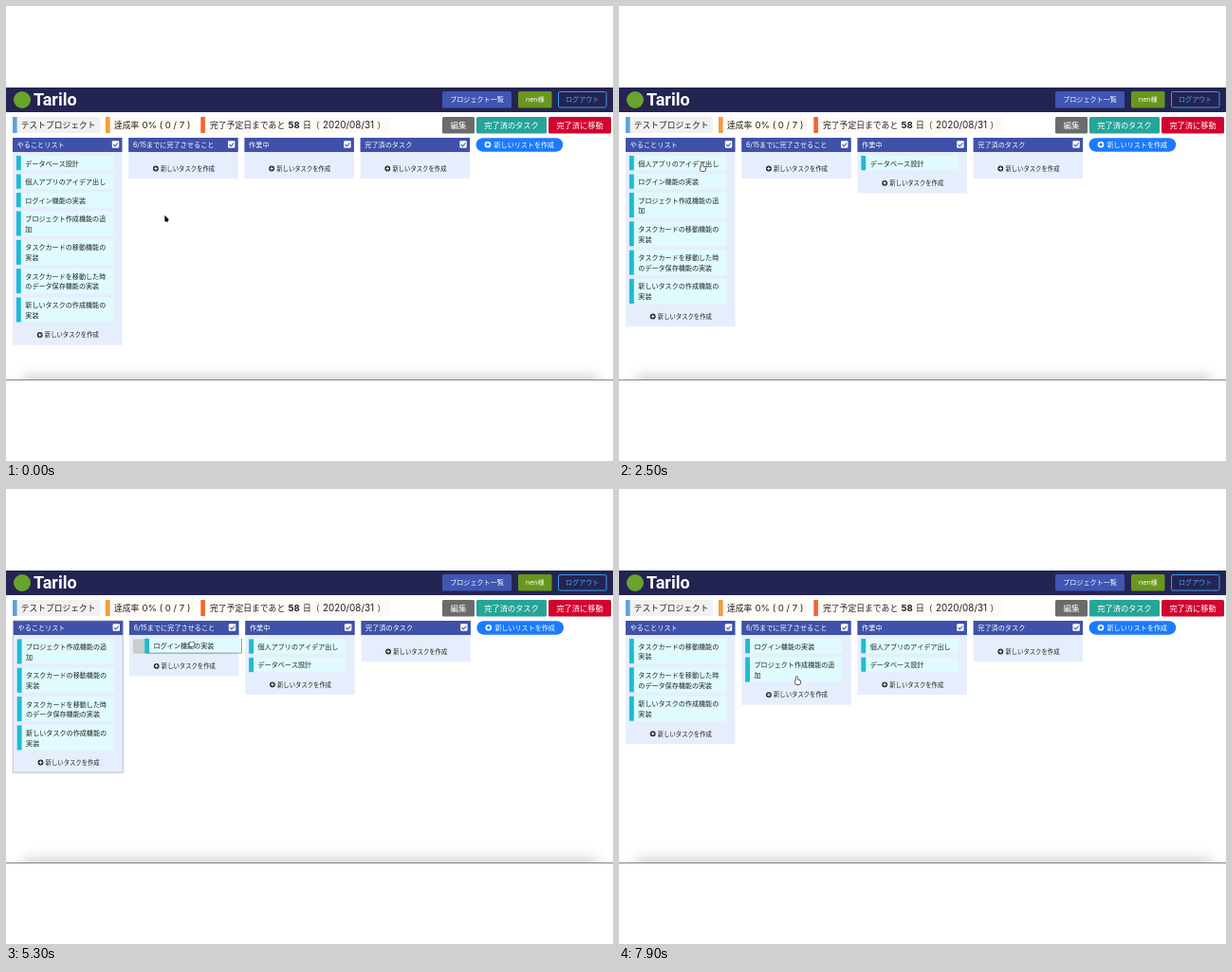
Animation of 640x480 px, one loop 8000 ms. Source, as an HTML page with a canvas:

```html
<!DOCTYPE html>
<html lang="ja">
<head>
<meta charset="utf-8">
<title>タスクボード</title>
<style>
html, body { margin: 0; width: 100%; height: 100%; overflow: hidden; background: #fff; }
canvas { display: block; width: 640px; height: 480px; }
</style>
</head>
<body>
<canvas id="stage" width="640" height="480"></canvas>
<script>
const ctx = document.getElementById('stage').getContext('2d');
const LOOP = 8000, STEP = 100;
const REST = 200; // pause at every pointer stop
const LAG = 250;  // the free slot trails the pointer
const FAMILY = 'Inter, "Noto Sans CJK JP", "Noto Sans CJK", sans-serif';
const INK = '#222', INDIGO = '#3f51a9', PALE = '#e6eefd';
const TOP = 158, LEFT = 7, PITCH = 122.2, LIST_W = 115.5, CARD_W = 102.3, INSET = 3.9, GAP = 4.2;

const tasks = [
  'データベース設計',
  '個人アプリのアイデア出し',
  'ログイン機能の実装',
  'プロジェクト作成機能の追加',
  'タスクカードの移動機能の実装',
  'タスクカードを移動した時のデータ保存機能の実装',
  '新しいタスクの作成機能の実装'
].map(s => s.match(/.{1,12}/g)); // twelve characters fit on a line

const columns = ['やることリスト', '6/15までに完了させること', '作業中', '完了済のタスク'];

// Pointer stops: arrival time, x, y, action on leaving
const stops = [
  [-100, 169, 224.5],
  [500, 71.5, 159.5, 'pick'], [1600, 315, 172, 'drop'],
  [2400, 88.5, 170, 'pick'], [3300, 318, 166, 'drop'],
  [3900, 75, 168],
  [4400, 61.5, 164.5, 'pick'], [5300, 196, 164, 'drop'],
  [6000, 46.7, 160.7, 'pick'], [6600, 190.5, 169.5], [7200, 188.5, 202, 'drop']
];
const leaving = action => stops.filter(s => s[3] === action).map(s => s[0] + REST);
const picks = leaving('pick'), drops = leaving('drop');

function pointer(t) {
  const i = stops.findLastIndex(s => s[0] <= t);
  const [t0, x0, y0] = stops[i], [t1, x1, y1] = stops[i + 1] || [LOOP, x0, y0];
  const u = Math.max(0, (t - t0 - REST) / (t1 - t0 - REST)), k = u * u * (3 - 2 * u);
  return [x0 + (x1 - x0) * k, y0 + (y1 - y0) * k];
}

// The first card of the first list is always the one taken
function board(t) {
  const lists = [tasks.map((_, i) => i), [], [], []];
  picks.forEach((start, card) => {
    if (t < start) return;
    const [x, y] = pointer(Math.max(start, Math.min(t, drops[card]) - LAG));
    const list = lists[Math.floor((x - LEFT) / PITCH)];
    lists[0].shift();
    list.splice(Math.floor((y - TOP) / 20), 0, card);
  });
  return lists;
}

function box(x, y, w, h, color, r = 0) {
  ctx.fillStyle = color;
  ctx.beginPath();
  ctx.roundRect(x, y, w, h, r);
  ctx.fill();
}
function outline(x, y, w, h, color, width, r = 0) {
  ctx.strokeStyle = color;
  ctx.lineWidth = width;
  ctx.beginPath();
  ctx.roundRect(x, y, w, h, r);
  ctx.stroke();
}
function text(s, x, cy, size, color = INK, align = 'left', weight = 400) {
  ctx.font = `${weight} ${size}px ${FAMILY}`;
  ctx.textAlign = align;
  ctx.fillStyle = color;
  ctx.fillText(s, x, cy + size * 0.37);
}
function line(points, color, width) {
  ctx.strokeStyle = color;
  ctx.lineWidth = width;
  ctx.beginPath();
  points.forEach(p => ctx.lineTo(...p));
  ctx.stroke();
}
function button(x, y, w, label, size, color) {
  box(x, y, w, 17.5, color, 1.5);
  text(label, x + w / 2, y + 8.7, size, '#fff', 'center');
}
function tag(x, w, bar, fill) {
  box(x, 117, w, 17, fill);
  box(x, 117, 4.6, 17, bar);
}
function plus(x, y, r, color, cross) {
  const arm = r * .58;
  box(x - r, y - r, 2 * r, 2 * r, color, r);
  line([[x - arm, y], [x + arm, y]], cross, r * .4);
  line([[x, y - arm], [x, y + arm]], cross, r * .4);
}

function drawFrame() {
  box(0, 0, 640, 480, '#fff');

  box(0, 86, 640, 26, '#242452');
  box(8, 90, 18, 18, '#68a32b', 9);
  ctx.font = 'bold 18px Roboto, sans-serif';
  ctx.textAlign = 'left';
  ctx.fillStyle = '#fff';
  ctx.fillText('Tarilo', 29, 105);
  button(460, 90, 73, 'プロジェクト一覧', 7.1, '#4056b2');
  button(540, 90, 35.5, 'nen様', 7.1, '#69961c');
  outline(582.5, 90.5, 50.5, 16.5, '#3d9be8', 1, 1.5);
  text('ログアウト', 607.7, 98.7, 7.1, '#4ba5f0', 'center');

  tag(7, 92, '#5fa3dc', '#f1f1f1');
  text('テストプロジェクト', 15.7, 125.5, 8.75);
  tag(105, 93, '#f59b3c', '#fffaf3');
  text('達成率', 114, 125.5, 8.75);
  text('0% ( 0 / 7 )', 143.5, 125.5, 9.6);
  tag(205.3, 200, '#f3652f', '#fff9f5');
  text('完了予定日まであと', 215, 125.5, 8.8);
  text('58', 297.5, 125.5, 9.6, INK, 'left', 700);
  text('日（', 313, 125.5, 8.8);
  text('2020/08/31', 334, 125.5, 9.9);
  text('）', 391.5, 125.5, 8.8);
  button(460, 117, 34, '編集', 8.5, '#6b6b6b');
  button(496, 117, 74, '完了済のタスク', 8.2, '#25a598');
  button(572, 117, 66, '完了済に移動', 8.2, '#d2042f');

  // Soft shadow above the window's lower edge
  ctx.save();
  ctx.beginPath();
  ctx.rect(0, 370, 640, 24);
  ctx.clip();
  ctx.shadowColor = 'rgba(0,0,0,.19)';
  ctx.shadowBlur = 13;
  ctx.shadowOffsetY = 400;
  box(18, -10, 606, 20, '#000');
  ctx.restore();
  box(0, 394, 640, 1, '#848484');
}

const cardHeight = c => 4.5 + 10.8 * tasks[c].length;

function drawCard(c, x, y) {
  box(x, y, CARD_W, cardHeight(c), '#e0fbfe');
  box(x, y, 4.9, cardHeight(c), '#20bad3');
  tasks[c].forEach((s, i) => text(s, x + 9.4, y + 7.9 + 10.8 * i, 7.08));
}

function drawHand(x, y, closed) {
  ctx.beginPath();
  ctx.roundRect(x - 2.6, y - (closed ? 2.4 : .6), 5.2, 4.6, 1.6);
  if (!closed) ctx.roundRect(x - 1.7, y - 3.9, 1.6, 5.5, .8);
  ctx.lineWidth = 1.3;
  ctx.strokeStyle = INK;
  ctx.stroke();
  ctx.fillStyle = '#fff';
  ctx.fill();
}

function drawArrow(x, y) {
  ctx.beginPath();
  [[-1.6, -3.8], [-1.6, 2.4], [1, 3.6], [2.7, .8]].forEach(([a, b]) => ctx.lineTo(x + a, y + b));
  ctx.fillStyle = '#000';
  ctx.fill();
}

function draw(t) {
  const [px, py] = pointer(t);
  const lists = board(t);
  const held = picks.findIndex((start, i) => t >= start && t < drops[i]);
  const dragging = held >= 0, shift = dragging ? .8 : 0;
  let hover = false;

  drawFrame();
  columns.forEach((title, i) => {
    const x = LEFT + PITCH * i + shift, cx = x + INSET;
    let y = TOP;
    const slots = lists[i].map(c => {
      const slot = { c, y, h: cardHeight(c) };
      y += slot.h + GAP;
      return slot;
    });
    const end = slots.length ? y : TOP + GAP;

    box(x, 139, LIST_W, end - 119, PALE);
    box(x, 139, LIST_W, 15, INDIGO);
    text(title, x + 4.7, 146.2, 7.15, '#fff');
    box(x + 104.8, 142.3, 7.4, 7.4, '#fff', 1);
    line([[x + 106.2, 146.1], [x + 107.9, 147.9], [x + 111, 144.5]], INDIGO, 1.1);
    plus(x + 28.7, end + 9.3, 2.9, INK, PALE);
    text('新しいタスクを作成', x + 33.8, end + 9.3, 6.35);

    for (const { c, y, h } of slots) {
      if (c === held) box(cx, y + .5, CARD_W, h, '#cbcbcb');
      else drawCard(c, cx, y + shift / 2);
      hover ||= px > cx && px < cx + CARD_W && py > y && py < y + h;
    }
    if (dragging && i === 0) outline(7.3, 139, 116, end - 119, '#9a9da8', .6);
  });

  box(495.6 + shift, 139.2, 91.6, 14.5, '#1c7bfb', 7.2);
  plus(508 + shift, 146.2, 3.3, '#fff', '#1c7bfb');
  text('新しいリストを作成', 514.6 + shift, 146.2, 7.05, '#fff');

  if (dragging) {
    const [gx, gy] = pointer(picks[held]), h = cardHeight(held);
    const x = LEFT + .8 + INSET + px - gx, y = TOP + .3 + py - gy;
    drawCard(held, x, y);
    line([[x, y + h], [x + CARD_W, y + h], [x + CARD_W, y]], '#7d8a90', .8);
  }
  if (dragging || hover) drawHand(px, py, dragging);
  else drawArrow(px, py);
}

const began = performance.now();
function tick() {
  const t = Math.max(0, performance.now() - began) % LOOP;
  draw(Math.floor(t / STEP) * STEP);
  requestAnimationFrame(tick);
}
tick();
</script>
</body>
</html>
```
